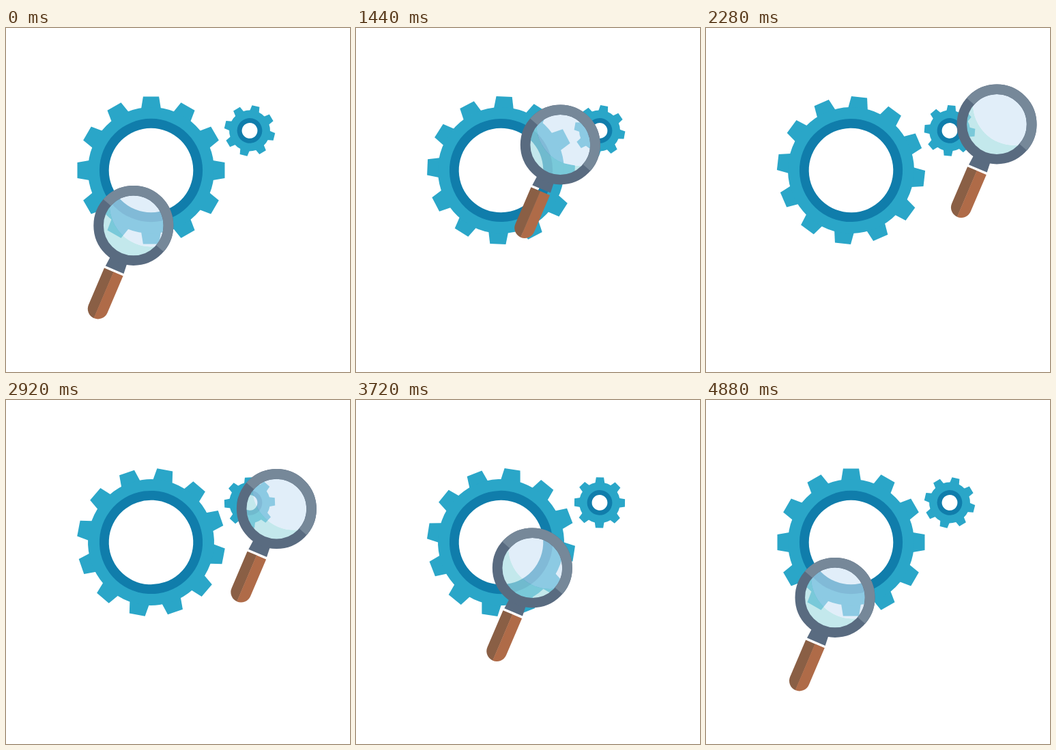
Write an HTML page that moves like this. It is 504x504 px and loops after 4.92 s.

```html
<!DOCTYPE html>
<html lang="en">
<head>
<meta charset="utf-8">
<title>Gears and magnifier</title>
<style>
  html, body { margin: 0; width: 100%; height: 100%; overflow: hidden; background: #fff; }
  svg { display: block; width: 100vw; height: 100vh; }
</style>
</head>
<body>
<svg viewBox="0 0 504 504">
  <defs>
    <clipPath id="glassClip"><circle r="45"/></clipPath>
  </defs>
  <g id="big"></g>
  <g id="small"></g>
  <g id="magnifier">
    <g clip-path="url(#glassClip)">
      <path fill="#a4dce2" fill-opacity=".65" fill-rule="evenodd"
        d="M-50-50H50V50H-50Z M-35-30a61 61 0 1 0 122 0a61 61 0 1 0-122 0Z"/>
      <circle cx="26" cy="-30" r="61" fill="#cde3f5" fill-opacity=".6"/>
    </g>
    <g transform="rotate(23.1)">
      <path fill="#596b80" d="M-13 53H13L14.5 70.5H-14.5Z"/>
      <path fill="#8a5f45" d="M0 74H-15V132.6A15 15 0 0 0 0 147.6Z"/>
      <path fill="#af6b48" d="M-.3 74H15V132.6A15 15 0 0 1-.3 147.6Z"/>
    </g>
    <circle r="51.2" fill="none" stroke="#596b80" stroke-width="14.6"/>
    <path transform="rotate(41)" fill="none" stroke="#768899" stroke-width="14.6"
      d="M-51.2 0A51.2 51.2 0 0 1 51.2 0"/>
  </g>
</svg>
<script>
const LOOP = 4920, SPIN = 4880;
const byId = id => document.getElementById(id);
const big = byId('big'), small = byId('small'), magnifier = byId('magnifier');

const disc = r => `M${-r} 0a${r} ${r} 0 1 0 ${2 * r} 0a${r} ${r} 0 1 0 ${-2 * r} 0Z`;

function buildGear(g, { teeth, tip, body, tipHalf, baseHalf, ring, hole }) {
  const base = body - 2;
  const tooth = `M${-baseHalf} ${-base}L${-tipHalf} ${-tip}H${tipHalf}L${baseHalf} ${-base}Z`;
  let parts = '';
  for (let i = 0; i < teeth; i++) {
    parts += `<path fill="#2aa6c8" d="${tooth}" transform="rotate(${i * 360 / teeth})"/>`;
  }
  const band = (r, inner, color) =>
    `<path fill="${color}" fill-rule="evenodd" d="${disc(r)}${disc(inner)}"/>`;
  g.innerHTML = parts + band(body, ring - 1, '#2aa6c8') + band(ring, hole, '#107dab');
}

buildGear(big, { teeth: 12, tip: 108, body: 92.5, tipHalf: 11.6, baseHalf: 14.4, ring: 75.6, hole: 61.8 });
buildGear(small, { teeth: 8, tip: 37, body: 30, tipHalf: 5.6, baseHalf: 7, ring: 18.4, hole: 11.4 });

// Outward sweep: [ms, x, y]
const sweep = [
  [0, 186.8, 289.4], [120, 175, 270], [300, 170.5, 232], [560, 175.5, 173],
  [800, 193, 126], [960, 217, 107.7], [1120, 245, 120.5], [1440, 299.3, 171],
  [1680, 341, 198], [1780, 361, 202], [2000, 401, 183], [2240, 426, 141]
];
const rest = [426, 141], home = [189, 289.4];
const BACK = 2500, ARRIVE = 4400;

function slope(i, k) {
  const a = sweep[Math.max(i - 1, 0)];
  const b = sweep[Math.min(i + 1, sweep.length - 1)];
  return (b[k] - a[k]) / (b[0] - a[0]);
}

function sweepAt(t) {
  let i = 0;
  while (sweep[i + 1][0] < t) i++;
  const a = sweep[i], b = sweep[i + 1], d = b[0] - a[0];
  const u = (t - a[0]) / d, v = 1 - u;
  return [1, 2].map(k =>
    v * v * (1 + 2 * u) * a[k] + u * u * (3 - 2 * u) * b[k] +
    d * u * v * (v * slope(i, k) - u * slope(i + 1, k)));
}

function lensAt(t) {
  if (t < 2240) return sweepAt(t);
  const p = Math.min(1, Math.max(0, (t - BACK) / (ARRIVE - BACK)));
  const e = p * p * (3 - 2 * p);
  return rest.map((r, k) => r + (home[k] - r) * e);
}

const place = (el, x, y, angle = 0) =>
  el.setAttribute('transform', `translate(${x} ${y}) rotate(${angle})`);

function draw(t) {
  const turn = Math.min(t / SPIN, 1) * 360;
  place(big, 212.5, 208.5, turn * 2);
  place(small, 357, 150.4, 14 - turn * 3);
  place(magnifier, ...lensAt(t));
}

let start;
function tick(now) {
  start ??= now;
  draw((now - start) % LOOP);
  requestAnimationFrame(tick);
}
draw(0);
requestAnimationFrame(tick);
</script>
</body>
</html>
```
